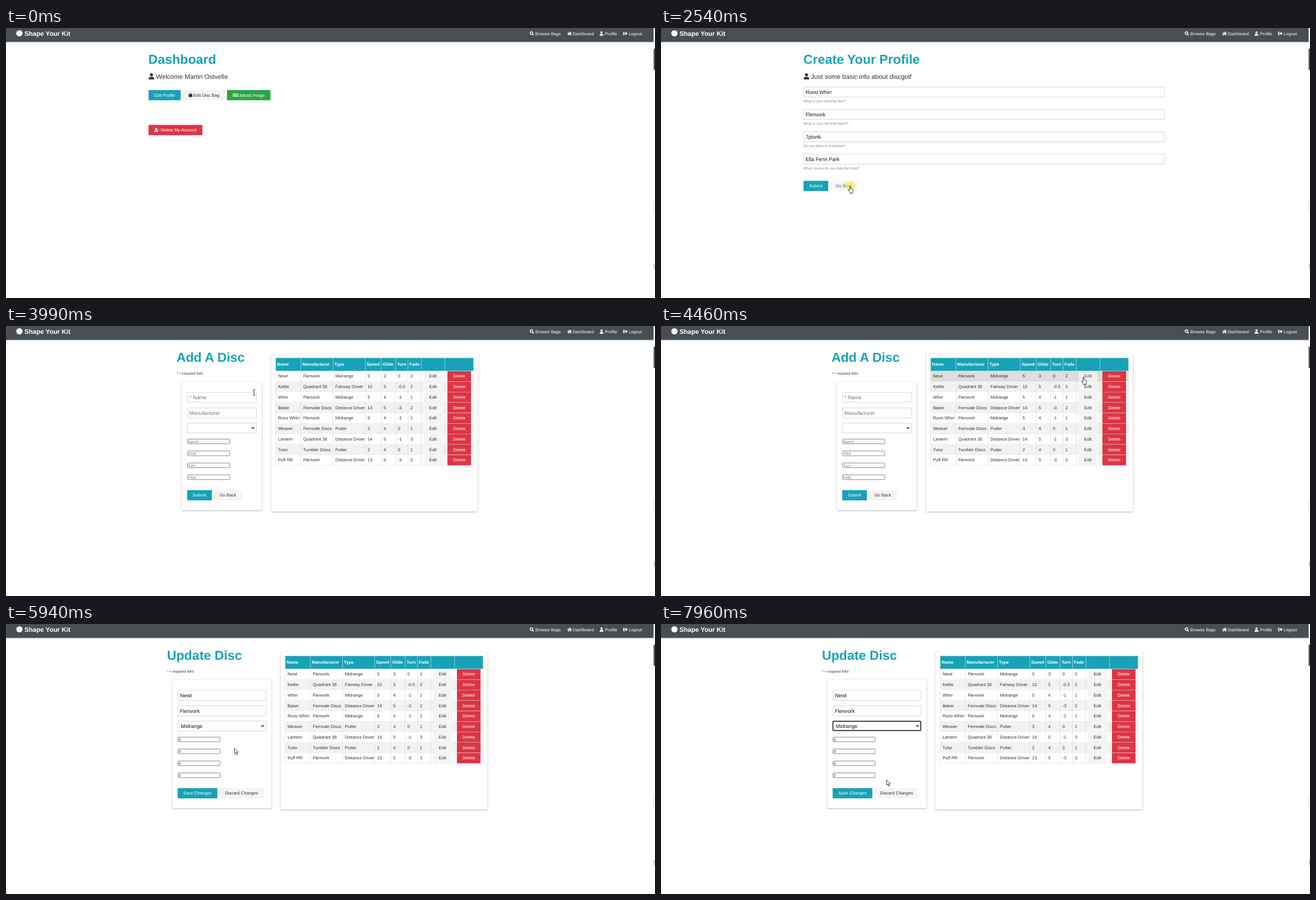
Recreate the animation shown at these times as an HTML page. Size 1160x483 px, loop 8000 ms.

```html
<!DOCTYPE html>
<html lang="en">
<head>
<meta charset="utf-8">
<title>Disc bag dashboard</title>
<style>
html, body { margin: 0; width: 100%; height: 100%; overflow: hidden; background: #fff; }
svg { display: block; width: 100%; height: 100%; font-family: "Liberation Sans", Arial, sans-serif; }
text { white-space: pre; text-rendering: geometricPrecision; }
.card { filter: drop-shadow(0 1px 1.5px rgba(0, 0, 0, .3)); }
.btn.on { opacity: .8; }
.row.on > rect:first-child { fill: #ddd; }
</style>
</head>
<body>
<svg id="stage" viewBox="0 0 1160 483"></svg>
<script>
const LOOP = 8000, TEAL = '#17a2b8', DARK = '#333', LIGHT = '#f4f4f4', RED = '#dc3545';
const BASE = 7.73, LEAD = 11.6, LARGE = 23.2, FIELD = 9.28, SMALL = 6.44;
const stage = document.getElementById('stage');

const rect = (x, y, w, h, fill, extra = '') =>
  `<rect x="${x}" y="${y}" width="${w}" height="${h}" fill="${fill}" ${extra}/>`;
const text = (x, y, size, str, fill = DARK, weight = 400) =>
  `<text x="${x}" y="${y}" font-size="${size}" fill="${fill}" font-weight="${weight}">${str}</text>`;
const line = (x1, y1, x2, y2) => `<path d="M${x1} ${y1}L${x2} ${y2}" stroke="#ddd" stroke-width=".7"/>`;
const group = (id, body) => `<g id="${id}">${body}</g>`;

// Icons are drawn on a 16 unit grid.
const USER = '<circle cx="8" cy="4" r="4"/><path d="M1 16v-2q0-4.5 4.5-4.5h5q4.500 0 4.500 4.500v2z"/>';
const ICONS = {
  user: USER,
  minus: USER + '<path d="M14 6h6v2h-6z"/>',
  search: '<circle cx="6.5" cy="6.5" r="5" fill="none" stroke="#fff" stroke-width="2.8"/><path d="M10 12l2-2 4 4-2 2z"/>',
  home: '<path d="M0 8L9 1l3 2.300V2h2v3l4 3-1 1.200L9 3.200 1 9.200zM3 9.500l6-4.700 6 4.700V15h-4v-4H7v4H3z"/>',
  exit: '<path d="M6 1.5v2.2H3v8.600h3v2.200H2.500Q0 14.500 0 12V4q0-2.500 2.500-2.500zM5 5.700h5V1.500L16.500 8 10 14.500v-4.200H5z"/>',
  bag: '<path d="M1 5h14v9q0 2-2 2H3q-2 0-2-2z"/><path d="M5 6V4q0-3 3-3t3 3v2" fill="none" stroke="#333" stroke-width="1.8"/>',
  news: '<path d="M4 3h14v11H2q-1.5 0-1.5-2V5H4v8M7 6h4v3H7zM13 6h3M13 8.500h3M7 11.500h9" fill="none" stroke="#fff" stroke-width="1.6"/>'
};
const icon = (name, x, y, size, fill) =>
  `<g transform="translate(${x} ${y}) scale(${size / 16})" fill="${fill}">${ICONS[name]}</g>`;

const button = (x, y, w, label, bg, fill = '#fff', pad = 10, extra = '') =>
  `<g class="hot btn">${rect(x, y, w, 18.3, bg)}${extra}${text(x + pad, y + 11.6, BASE, label, fill)}</g>`;
const box = (x, y, w) => rect(x + .4, y + .4, w, 17.6, '#fff', 'stroke="#ccc" stroke-width=".8"');
const field = (x, y, w, value, fill = '#111') =>
  `<g class="hot field">${box(x, y, w)}${text(x + 3.8, y + 12.3, FIELD, value, fill)}</g>`;
const number = (x, y, value, fill) =>
  `<g class="hot field">${rect(x + .4, y, 75.4, 8.4, '#fff', 'rx="1" stroke="#767676" stroke-width=".9"')}` +
  text(x + 1.4, y + 6.5, SMALL, value, fill) + '</g>';
const heading = (x, str) => text(x, 64.3, LARGE, str, TEAL, 700);
const lead = str => icon('user', 254.5, 81, 11, DARK) + text(268, 90.8, LEAD, str);

function header() {
  const links = [['search', 946, 'Browse Bags'], ['home', 1013, 'Dashboard'], ['user', 1070.5, 'Profile'], ['exit', 1113, 'Logout']];
  return rect(0, 0, 1157.5, 24.2, '#484e53') + rect(0, 24.2, 1157.5, 1.1, '#2f6a78') +
    '<circle cx="24" cy="9.5" r="5.6" fill="#fff"/>' + text(33, 13.8, LEAD, 'Shape Your Kit', '#fff', 700) +
    links.map(([name, x, label]) => icon(name, x - 10, 6, 7.7, '#fff') + text(x, 12.7, BASE, label, '#fff')).join('') +
    rect(1157.5, 37, 2.5, 38, '#555') + rect(1157.8, 311.5, 4, 17, '#fff', 'stroke="#ccc" stroke-width=".7"') +
    rect(1157.5, 421, 2.5, 10.5, '#ddd') + rect(1158.8, 425.5, 1.2, 1.5, '#777');
}

const dashboard = () => heading(254.6, 'Dashboard') + lead('Welcome Martin Ostvelle') +
  button(254.8, 111, 57.4, 'Edit Profile', TEAL) +
  button(316, 111, 75.6, 'Edit Disc Bag', LIGHT, DARK, 19, icon('bag', 326, 116, 7.5, DARK)) +
  button(395, 111, 77.5, 'Upload Image', '#28a745', '#fff', 19.2, icon('news', 405, 116, 7.6, '#fff')) +
  button(254.8, 173.4, 96.2, 'Delete My Account', RED, '#fff', 21.7, icon('minus', 264.5, 178.4, 7.7, '#fff'));

function profile() {
  const fields = [['Runo Whirr', 'What is your favorite disc?'], ['Flenvork', 'What is your favorite brand?'],
    ['7plonk', 'Do you have a nickname?'], ['Ella Fenn Park', 'What course do you play the most?']];
  return heading(254.6, 'Create Your Profile') + lead('Just some basic info about discgolf') +
    fields.map(([value, hint], i) => field(254.6, 105.2 + 40.1 * i, 645, value) +
      text(254.6, 132.8 + 40.1 * i, SMALL, hint, '#888')).join('') +
    button(254.8, 273.4, 44.2, 'Submit', TEAL) + button(302.8, 273.4, 49.2, 'Go Back', LIGHT, DARK);
}

const DISCS = `Newt|Flenvork|Midrange|5|3|0|2
Kettle|Quadrant 38|Fairway Driver|10|5|-0.5|2
Whirr|Flenvork|Midrange|5|4|-1|1
Baker|Fernvale Discs|Distance Driver|14|5|-3|2
Runo Whirr|Flenvork|Midrange|5|4|-1|1
Weaver|Fernvale Discs|Putter|3|4|0|1
Lantern|Quadrant 38|Distance Driver|14|5|-1|3
Tutor|Tumbler Discs|Putter|2|4|0|1
Puff RR|Flenvork|Distance Driver|13|5|-3|3`.split('\n').map(s => s.split('|'));
const COLUMNS = [['Name', 45], ['Manufacturer', 57.5], ['Type', 57.5], ['Speed', 28.7], ['Glide', 25.6],
  ['Turn', 22.2], ['Fade', 23.8], ['', 42.4], ['', 51]];
const LEFT = 482, WIDTH = 353.7, TOP = 80.6, ROW = 18.75;

function table(dx) {
  let x = LEFT;
  const starts = COLUMNS.map(([, w]) => (x += w) - w);
  const grid = (y, h) => [...starts, LEFT + WIDTH].map(cx => line(cx, y, cx, y + h)).join('') +
    line(LEFT, y + h, LEFT + WIDTH, y + h);
  const rows = DISCS.map((disc, i) => {
    const y = TOP + ROW * i;
    return `<g class="hot row">${rect(LEFT, y, WIDTH, ROW, i % 2 ? '#f2f2f2' : '#fff')}${grid(y, ROW)}` +
      disc.map((s, c) => text(starts[c] + 4.2, y + 11.7, BASE, s)).join('') +
      button(746.6, y + .2, 33.4, 'Edit', LIGHT, DARK) + button(789, y + .2, 42.2, 'Delete', RED) + '</g>';
  }).join('');
  return `<g transform="translate(${dx} 0)">${rect(474, 50, 369.6, 281.8, '#fff', 'class="card"')}` +
    rect(LEFT, 57, WIDTH, TOP - 57, TEAL) + line(LEFT, 57, LEFT + WIDTH, 57) + grid(57, TOP - 57) +
    COLUMNS.map(([s], c) => text(starts[c] + 2.6, 71.3, BASE, s, '#fff', 700)).join('') + rows + '</g>';
}

function discPage(x, dx, title, w, [name, maker, type, ...stats], fill, buttons) {
  return heading(x - 19.3, title) + text(x - 19, 86.5, SMALL, '* = required field') +
    rect(x - 9.8, 99.6, w + 19.8, 229.8, '#fff', 'class="card"') +
    field(x, 118.4, w, name, fill) + field(x, 146.3, w, maker, fill) + box(x, 173.3, w) +
    text(x + 5.6, 185.7, FIELD, type, '#111') +
    `<path d="M${x + w - 8.3} 181l2.3 2.4 2.300-2.400" fill="none" stroke="#111" stroke-width="1.2"/>` +
    stats.map((s, i) => number(x, 202.3 + 21.35 * i, s, fill)).join('') + buttons + table(dx);
}

const add = () => discPage(324, 0, 'Add A Disc', 123.3,
  ['* Name', 'Manufacturer', '', 'Speed', 'Glide', 'Turn', 'Fade'], '#757575',
  button(323.8, 293.6, 44.2, 'Submit', TEAL) + button(371.8, 293.6, 50, 'Go Back', LIGHT, DARK));
const update = () => discPage(307, 17, 'Update Disc', 157.5, DISCS[0], '#111',
  button(306.8, 293.6, 71, 'Save Changes', TEAL) + button(381.5, 293.6, 79.5, 'Discard Changes', LIGHT, DARK)) +
  group('ring', rect(307.4, 173.9, 156.8, 16.7, 'none', 'rx="1" stroke="#111" stroke-width="1.5"'));

function dropdown() {
  const kinds = ['', 'Distance Driver', 'Fairway Driver', 'Midrange', 'Putter'];
  return rect(306.8, 191.4, 158, 61, '#fff', 'stroke="#767676" stroke-width=".8"') +
    rect(307.2, 228.1, 157.2, 12.1, '#1967d2') +
    kinds.map((s, i) => text(311, 201 + 12.1 * i, FIELD, s, i == 3 ? '#fff' : '#111')).join('');
}

const OUTLINE = 'fill="#fff" stroke="#222" stroke-width=".9" stroke-linejoin="round"';
const POINTERS = {
  arrow: `<path d="M.3.3v9.700l2.200-2 1.600 3.700 1.700-.8-1.600-3.500h3z" ${OUTLINE}/>`,
  hand: `<path d="M-.9 8V1q.9-1.800 1.800 0v4.200l3.600.9q1.300.4 1.100 2l-.9 3.400v2H-.3v-1.200L-3.200 8.800q-.5-1.600 1-1.300z" ${OUTLINE}/>`,
  beam: '<path d="M-2.2-5h1.700l.5.5.5-.5h1.700M0-4.500v9M-2.200 5h1.700l.5-.5.5.5h1.700" fill="none" stroke="#333"/>'
};

const pages = { dashboard, profile, add, update };
stage.innerHTML = header() +
  Object.entries(pages).map(([id, make]) => group(id, make())).join('') +
  group('menu', dropdown()) +
  '<circle id="glow" r="7.7" fill="#ffeb3b" opacity=".75"/>' +
  group('pointer', Object.entries(POINTERS).map(([id, body]) => group(id, body)).join(''));

const el = id => document.getElementById(id);
const show = (id, on) => el(id).style.display = on ? '' : 'none';
const hot = Object.keys(pages).flatMap(page => [...el(page).querySelectorAll('.hot')].map(node => {
  const { x, y, width, height } = node.firstChild.getBBox();
  const left = x + (page == 'update' && node.closest('[transform]') ? 17 : 0);
  return { node, page, hit: (px, py) => px >= left && px < left + width && py >= y && py < y + height };
}));

// Pointer moves: start, end, x, y, sideways bend.
const ENTER = 200;
const MOVES = [[ENTER, 290, 1141, 473, 0], [400, 910, 233, 114, 0], [910, 1130, 279.5, 115.7, 0], [1780, 2390, 338, 282, 0],
  [2680, 3280, 361.3, 112.5, 0], [3850, 4000, 443.3, 119, 0], [4000, 4460, 755, 91, 12], [4460, 4610, 764, 89, 0],
  [5400, 5930, 408, 222, 0], [5930, 6230, 411, 282, 15], [6230, 6460, 310, 245, 0], [6460, 6720, 368, 194, 0],
  [6800, 7010, 354, 184, 0], [7500, 7950, 403, 278.5, 0]];
// Each view: start, name, and when it first reacts to the pointer.
const VIEWS = [[0, 'dashboard', ENTER], [1215, 'profile', 1370], [2680, 'dashboard', 2680], [3450, 'add', 3760], [5150, 'update', 5470]];
const CLICKS = [[1130, 1215], [2530, 2680], [3370, 3450], [4770, 5000], [7170, 7250]];
const MENU = [7250, 7560];

const during = (t, [from, to]) => t >= from && t < to;
const ease = u => u * u * (3 - 2 * u);

// The screen refreshes about 13 times a second.
const STEP = 77.4, PHASE = 55;
const snap = t => Math.max(0, PHASE + STEP * Math.floor((t - PHASE) / STEP + .25));

function position(t) {
  let x = 1143, y = 475;
  for (const [start, end, tx, ty, bend] of MOVES) {
    if (t < start) break;
    const u = ease(Math.min(1, (t - start) / (end - start)));
    const dx = tx - x, dy = ty - y, side = bend * 4 * u * (1 - u) / Math.hypot(dx, dy);
    x += dx * u - dy * side;
    y += dy * u + dx * side;
  }
  return [x, y];
}

function pointerShape(t, ready, hits) {
  if (t < ENTER) return '';
  const over = kind => hits.some(h => h.node.classList.contains(kind));
  return t < ready || over('btn') ? 'hand' : over('field') ? 'beam' : 'arrow';
}

function draw(t) {
  const [, view, ready] = VIEWS.filter(v => v[0] <= t).pop();
  const [x, y] = position(t);
  const hits = t < ready ? [] : hot.filter(h => h.page == view && h.hit(x, y));
  const shape = pointerShape(t, ready, hits);
  for (const id in pages) show(id, id == view);
  for (const id in POINTERS) show(id, id == shape);
  for (const id of ['pointer', 'glow']) el(id).setAttribute('transform', `translate(${x} ${y})`);
  for (const h of hot) h.node.classList.toggle('on', hits.includes(h));
  show('glow', CLICKS.some(c => during(t, c)));
  show('menu', during(t, MENU));
  show('ring', t >= MENU[1]);
}

function tick() {
  draw(snap(performance.now() % LOOP));
  requestAnimationFrame(tick);
}
tick();
</script>
</body>
</html>
```
